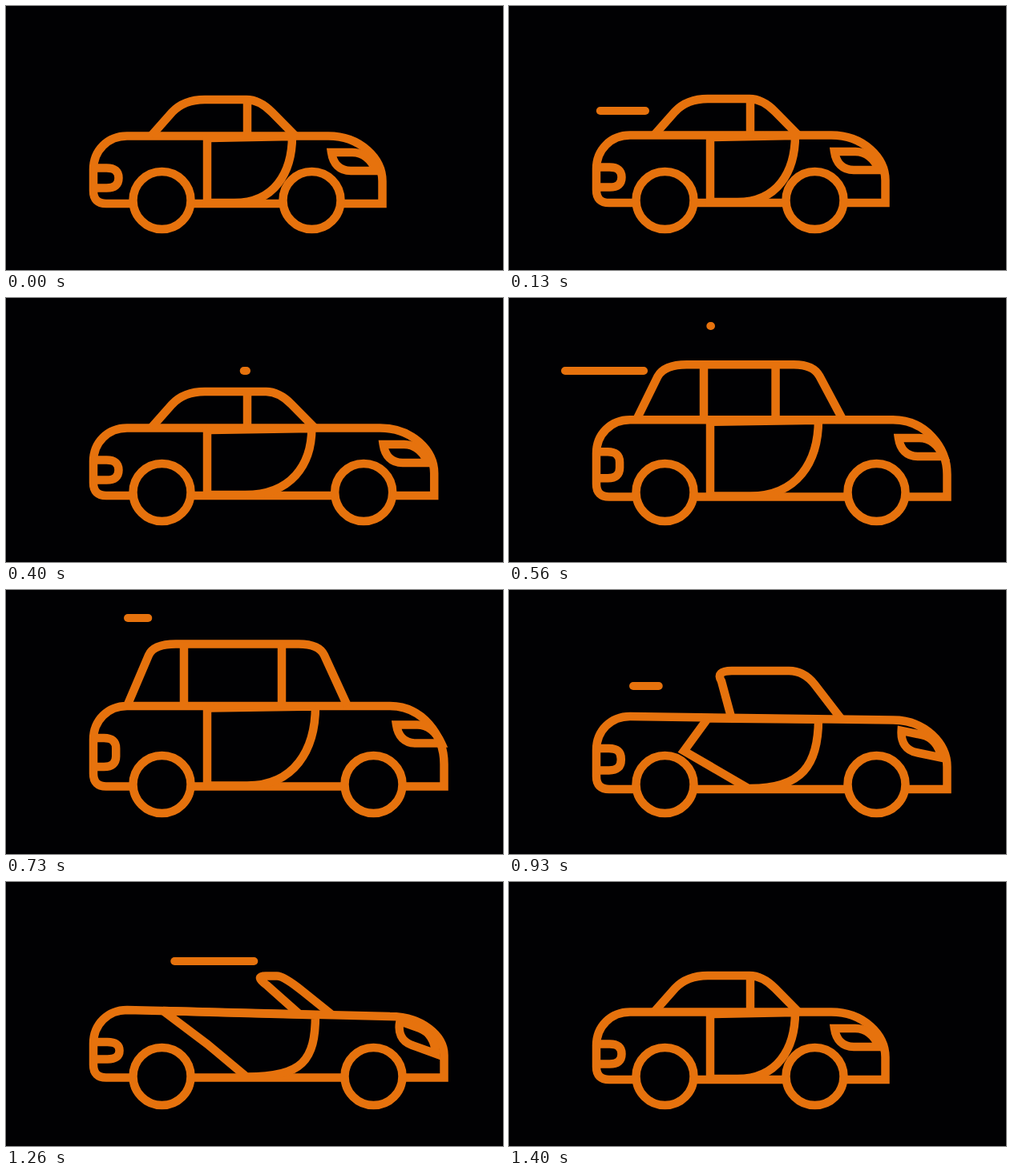
Animation of 620 by 330 pixels, one loop 1.43 s. Source, as an HTML page:

```html
<!DOCTYPE html>
<html lang="en">
<head>
<meta charset="utf-8">
<title>Morphing car</title>
<style>
  html, body { margin: 0; height: 100%; overflow: hidden; background: #010103; }
  svg { display: block; width: 620px; height: 330px; }
  svg * { fill: none; stroke: #e6720d; stroke-width: 10.5; }
  circle { fill: #010103; }
  #streaks { stroke-width: 10; stroke-linecap: round; }
</style>
</head>
<body>
<svg viewBox="0 0 620 330">
  <g id="car">
    <path id="body"/>
    <path id="door"/>
    <path id="roof"/>
    <path id="tail"/>
    <path id="head" d="M0 0H26C40 0 50 10 56 23H24C10 23 2 14 0 0Z"/>
  </g>
  <circle cx="194.5" cy="243" r="36"/>
  <circle id="front" cy="243" r="36"/>
  <path id="streaks"/>
</svg>
<script>
const LOOP = 1430;
const STREAK_TIME = 170;
const $ = id => document.getElementById(id);
const setPath = (id, d) => $(id).setAttribute('d', d);
const mix = (a, b, p) => a + (b - a) * p;
const span = (t, from, to) => Math.min(1, Math.max(0, (t - from) / (to - from)));
const glide = (t, from, to) => (1 - Math.cos(Math.PI * span(t, from, to))) / 2;

// The body rocks between these sill heights: time, y
const rocking = [[0, 247], [230, 245.5], [560, 248.5], [730, 245.5], [930, 249], [1260, 244.5], [1400, 247]];
const sillAt = t => rocking.reduce((y, [time, next], i) =>
  i ? mix(y, next, glide(t, rocking[i - 1][0], time)) : next, 0);

function streak(y, from, to, start, delay, t) {
  if (t < start || t >= start + delay + STREAK_TIME) return '';
  const at = s => mix(from, to, glide(t, s, s + STREAK_TIME));
  return `M${at(start)} ${y}H${at(start + delay) + .01}`;
}

function drawCar(t) {
  const back = glide(t, 1265, 1400);
  const stretch = glide(t, 150, 490) - back;
  const tall = glide(t, 430, 630) - span(t, 1030, 1260);
  const open = glide(t, 812, 1026) - back;
  const blend = (sedan, wagon, cabrio) => mix(mix(sedan, wagon, tall), cabrio, open);

  // Heights are measured from the sill.
  const w = 77 * stretch, k = 29 * stretch, nose = 469.5 + w;
  const left = blend(-84.5, -100.5, -84.5), right = blend(-84.5, -100.5, -76.5);
  const waist = x => mix(left, right, (x - 151) / (251 + w));
  $('car').setAttribute('transform', `translate(0 ${sillAt(t)})`);
  $('front').setAttribute('cx', 381.5 + w);
  setPath('body', `M${nose} 0H125Q109 0 109 -16V${left + 42}C109 ${left + 18} 127 ${left} 151 ${left}
    L${402 + w} ${right}C${442 + w} ${right} ${nose} ${mix(right, -28, .5)} ${nose} -28Z`);

  const headX = blend(406, 410, 414.5) + w, headY = right + blend(20.5, 23.5, 6);
  $('head').setAttribute('transform', `translate(${headX} ${headY}) rotate(${20 * open})`);

  const top = left + 40, bottom = blend(-19.5, -24.5, -23), height = bottom - top;
  const tip = 148 - .3 * height, r = Math.min(13, height / 2);
  setPath('tail', `M109 ${top}H${tip - 15}Q${tip} ${top} ${tip} ${top + r}
    V${bottom - r}Q${tip} ${bottom} ${tip - 15} ${bottom}H109`);

  // The door's rear edge folds: its foot leads, its top follows last.
  const fold = Math.sin(Math.PI * open);
  const hinge = 251 - 55 * open ** 6, foot = 251 + 49 * (1 - (1 - open) ** 4);
  const arc = 285 + 16 * stretch, edge = 357 + k, edgeY = waist(edge);
  const slack = blend(.45, .45, .27);
  setPath('door', `M${hinge} ${waist(hinge)}L${251 - 34 * fold} ${-42 - 6 * fold}L${foot} -1H${arc}
    C${mix(edge, arc, slack * .7)} -1 ${edge} ${edgeY * slack} ${edge} ${edgeY}
    M${hinge} ${waist(hinge) + 2.5 * (1 - open)}L${edge} ${edgeY + .5}`);

  const roofY = blend(-130, -178, -127);
  const rearX = blend(181, 151, 366), rearKnee = blend(207, 178, 326);
  const rearKneeY = blend(-114, -164, -115), rearCorner = blend(222, 184, 309);
  const roofEnd = blend(300, 336, 309) + k, frontX = roofEnd + blend(61, 61, 69);
  const frontKnee = roofEnd + 32, kneeDrop = blend(16, 14, 19);
  const frontY = waist(frontX);
  const frontCorner = frontKnee - (frontX - frontKnee) * kneeDrop / (frontY - roofY - kneeDrop);
  const posts = open < .4 ? [blend(301, 222, 345), blend(301, 344, 345)] : [];
  setPath('roof', `M${rearX} ${waist(rearX)}L${rearKnee} ${rearKneeY}
    Q${rearCorner} ${roofY} ${blend(248, 212, 324)} ${roofY}H${roofEnd}
    Q${frontCorner} ${roofY} ${frontKnee} ${roofY + kneeDrop}L${frontX} ${frontY}
    ${posts.map(x => `M${x} ${roofY}V${waist(x)}`).join('')}`);
}

function draw(t) {
  drawCar(t);
  setPath('streaks', streak(131, 170, 41, 53, 80, t) + streak(91, 300, 70, 388, 80, t)
    + streak(35, 252, 152, 552, 66, t) + streak(120, 260, 155, 744, 80, t)
    + streak(99, 330, 86, 1177, 52, t));
}

function tick(now) {
  draw(now % LOOP);
  requestAnimationFrame(tick);
}
draw(0);
requestAnimationFrame(tick);
</script>
</body>
</html>
```
